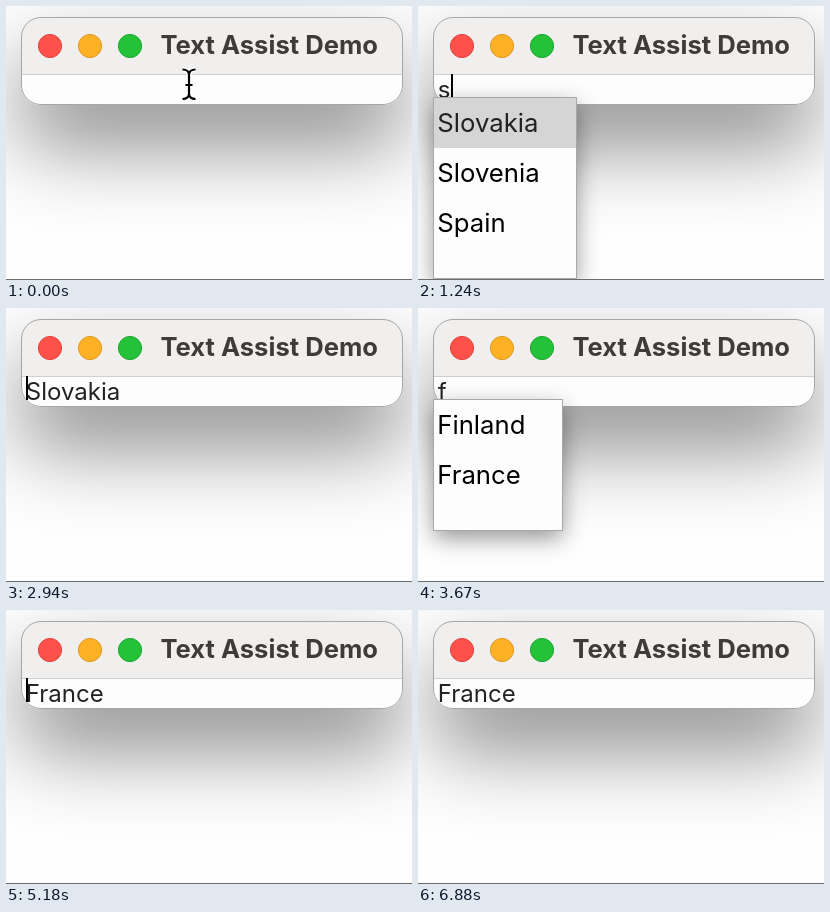
An HTML page with a canvas that plays this animation: 406 by 274 pixels, repeating every 7150 ms.

```html
<!DOCTYPE html>
<html lang="en">
<head>
<meta charset="utf-8">
<title>Text Assist Demo</title>
<style>
  html, body { margin: 0; width: 100%; height: 100%; overflow: hidden; background: #fefefe; }
  canvas { display: block; }
</style>
</head>
<body>
<canvas id="stage" width="406" height="274"></canvas>
<script>
const ctx = document.getElementById('stage').getContext('2d');
const LOOP = 7150;
const FONT = 'Inter, sans-serif';
const ROW = 50;
const S_LIST = { items: ['Slovakia', 'Slovenia', 'Spain'], width: 142 };
const F_LIST = { items: ['Finland', 'France'], width: 128 };

// Each step changes part of the state from the given time on.
const steps = [
  [0, { text: '', caret: 0, pointer: true, list: null, selected: -1 }],
  [30, { caret: 20 }],
  [250, { text: 's', caret: 33, pointer: false, list: S_LIST }],
  [760, { caret: 0 }],
  [850, { selected: 0 }],
  [1240, { caret: 33 }],
  [1450, { text: 'Slovakia', caret: 20, list: null, selected: -1 }],
  [1960, { caret: 0 }],
  [2470, { caret: 20 }],
  [2980, { caret: 0 }],
  [3040, { text: 'f', caret: 28, list: F_LIST }],
  [3550, { caret: 0 }],
  [4060, { caret: 28 }],
  [4580, { caret: 0, selected: 0 }],
  [4610, { selected: 1 }],
  [5060, { caret: 28 }],
  [5180, { text: 'France', caret: 20, list: null, selected: -1 }],
  [5700, { caret: 0 }],
  [6180, { caret: 20 }],
  [6670, { caret: 0 }]
];

function stateAt(time) {
  return Object.assign({}, ...steps.filter(([start]) => start <= time).map(([, change]) => change));
}

function fillRect(x, y, w, h, color) {
  ctx.fillStyle = color;
  ctx.fillRect(x, y, w, h);
}

function label(text, x, baseline, size, color, weight = 400) {
  ctx.font = `${weight} ${size}px ${FONT}`;
  ctx.fillStyle = color;
  ctx.fillText(text, x, baseline);
}

function panel(x, y, w, h, radius, shadowY, blur, alpha) {
  ctx.beginPath();
  ctx.roundRect(x, y, w, h, radius);
  ctx.save();
  ctx.shadowColor = `rgba(0, 0, 0, ${alpha})`;
  ctx.shadowOffsetY = shadowY;
  ctx.shadowBlur = blur;
  ctx.fillStyle = '#fdfdfd';
  ctx.fill();
  ctx.restore();
}

function outline(x, y, w, h, radius, color) {
  ctx.beginPath();
  ctx.roundRect(x, y, w, h, radius);
  ctx.lineWidth = 1;
  ctx.strokeStyle = color;
  ctx.stroke();
}

function windowButton(x, fill, edge) {
  ctx.beginPath();
  ctx.arc(x, 40, 11.6, 0, Math.PI * 2);
  ctx.fillStyle = fill;
  ctx.fill();
  ctx.lineWidth = 1;
  ctx.strokeStyle = edge;
  ctx.stroke();
}

function drawWindow({ text, caret }) {
  panel(15, 11, 382, 88, 20, 40, 82, 0.46);
  ctx.save();
  ctx.clip();
  fillRect(15, 11, 382, 57, '#f1efed');
  fillRect(15, 68, 382, 1, '#cfcfcf');
  label(text, 19.8, 92, 24, '#222');
  ctx.restore();
  outline(15.5, 11.5, 381, 87, 19.5, '#a6a6a6');
  windowButton(44, '#ff5149', '#e0443e');
  windowButton(84, '#ffb125', '#dd9a20');
  windowButton(124, '#23c239', '#1ba62f');
  label('Text Assist Demo', 154.5, 48, 25.6, '#3d3c3b', 700);
  if (caret) fillRect(caret, 68, 2, 24, '#000');
}

function drawList({ list, selected }) {
  const height = list.items.length * ROW + 30;
  panel(16, 92, list.width, height, 0, 8, 22, 0.42);
  list.items.forEach((item, i) => {
    const top = 92 + i * ROW;
    if (i === selected) fillRect(16, top, list.width, ROW, '#d5d5d5');
    label(item, 19.3, top + 34, 25.7, i === selected ? '#222' : '#000');
  });
  outline(15.5, 91.5, list.width + 1, height + 1, 0, '#a8a8a8');
}

function drawPointer() {
  const beam = new Path2D('M176.5 63.5 Q183 63.5 183 69 Q183 63.5 189.5 63.5' +
    'M183 68 V88 M176.5 93 Q183 93 183 87.5 Q183 93 189.5 93 M179.5 79 H186.5');
  for (const [width, color] of [[5, '#fff'], [2.2, '#000']]) {
    ctx.lineWidth = width;
    ctx.strokeStyle = color;
    ctx.stroke(beam);
  }
}

function frame(now) {
  const state = stateAt(now % LOOP);
  fillRect(0, 0, 406, 274, '#fefefe');
  drawWindow(state);
  if (state.list) drawList(state);
  if (state.pointer) drawPointer();
  fillRect(0, 273, 406, 1, '#6c6c6c');
  requestAnimationFrame(frame);
}

frame(performance.now());
</script>
</body>
</html>
```
